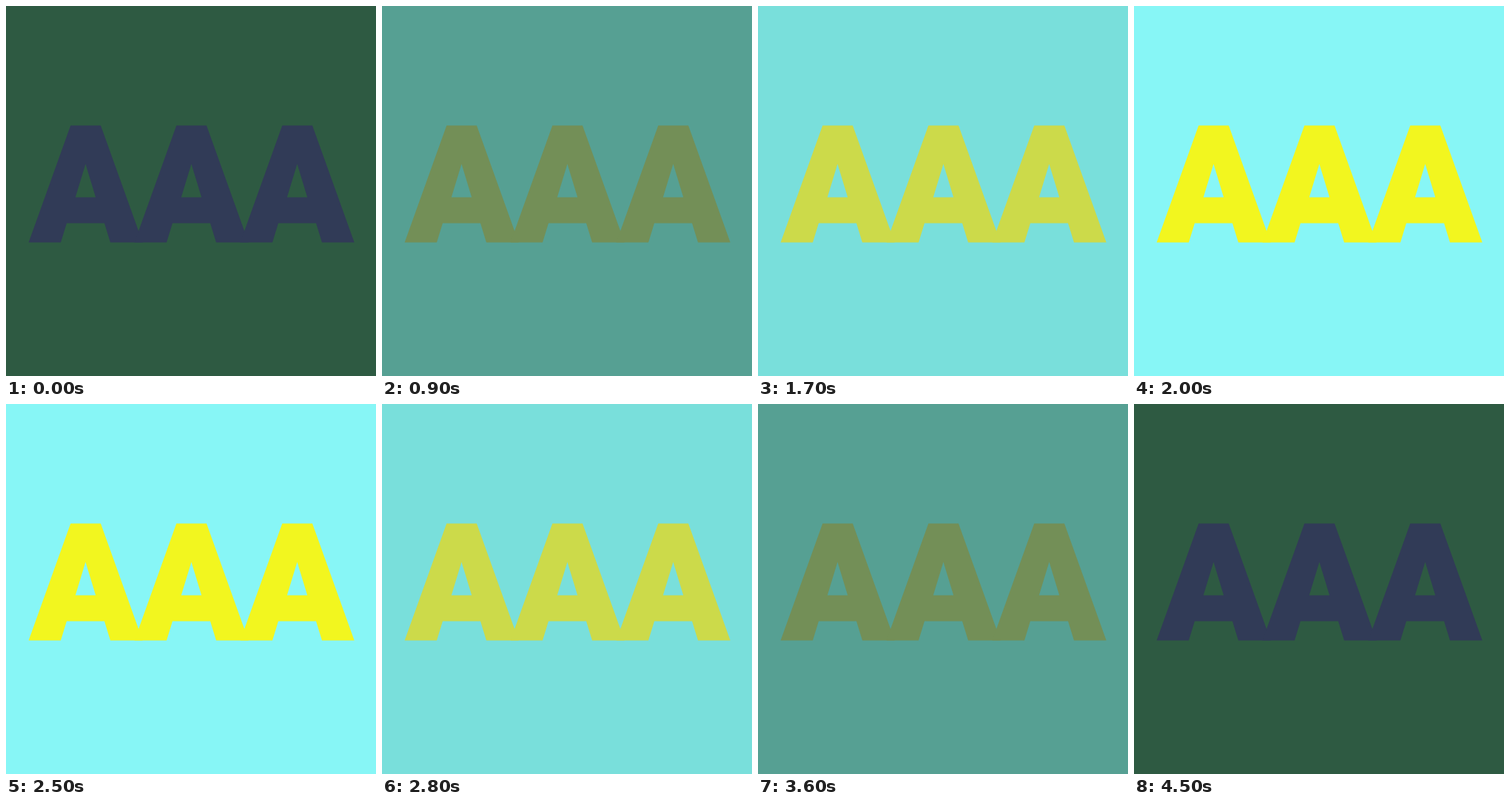
Write an HTML page that moves like this. It is 500 px wide and 500 px high and loops after 4600 ms.

```html
<!DOCTYPE html>
<html lang="en">
<head>
<meta charset="utf-8">
<title>AAA</title>
<style>
  html, body { margin: 0; width: 100%; height: 100%; overflow: hidden; }
  svg { display: block; width: 100%; height: 100%; }
</style>
</head>
<body>
<svg viewBox="0 0 500 500" role="img" aria-label="AAA">
  <defs>
    <path id="a" fill-rule="evenodd" d="M87.3 161.6H128L184.7 319.6H141L133 293.5H82L74 319.6H30.6ZM107.5 213.5L121.2 258.4H93.8Z"/>
  </defs>
  <rect id="back" width="500" height="500"/>
  <g id="word">
    <use href="#a"/>
    <use href="#a" x="143"/>
    <use href="#a" x="286"/>
  </g>
</svg>
<script>
  const STEP = 100, COUNT = 46, PEAK = 21;
  const back = document.getElementById('back');
  const word = document.getElementById('word');

  const channel = (from, to, k) => Math.round(from + (to - from) * k);
  const rgb = (r, g, b) => `rgb(${r}, ${g}, ${b})`;

  function draw(time) {
    const n = Math.floor(time / STEP) % COUNT;
    // brightens, holds at the peak, then runs back
    const k = Math.min(n, COUNT - 1 - n, PEAK) / PEAK;

    back.setAttribute('fill', rgb(
      channel(46, 139, k),
      channel(90, 254, k),
      channel(66, 255, k)));

    // red lags a little; blue fades only near the peak
    word.setAttribute('fill', rgb(
      channel(49, 255, k ** 1.35),
      channel(59, 255, k),
      channel(87, 0, k ** 9)));
  }

  const start = performance.now();
  function tick() {
    draw(performance.now() - start);
    requestAnimationFrame(tick);
  }
  tick();
</script>
</body>
</html>
```
